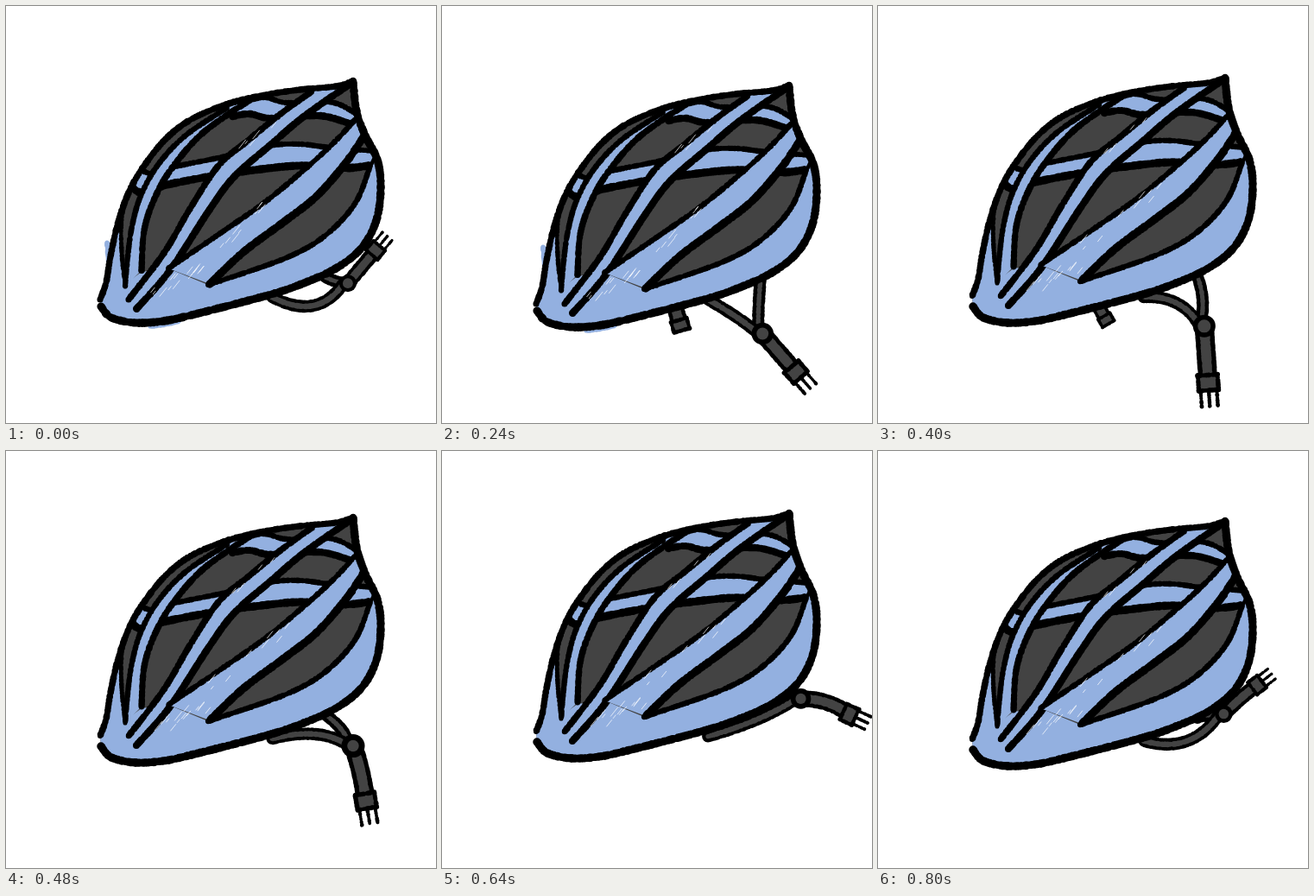
An HTML page with a canvas for the animation above (0.88 s loop, 498 px wide and 483 px high).

```html
<!DOCTYPE html>
<html lang="en">
<head>
<meta charset="utf-8">
<title>Helmet</title>
<style>
  html, body { margin: 0; width: 100%; height: 100%; overflow: hidden; background: #fff; }
  canvas { display: block; }
</style>
</head>
<body>
<canvas id="stage" width="498" height="483"></canvas>
<script>
const W = 498, H = 483, STEP = 80, COUNT = 11;
const BLACK = '#000', DARK = '#434343', BLUE = '#93b0e0';
const { sin, cos, PI, hypot } = Math;
const stage = document.getElementById('stage').getContext('2d');
let g = stage, seed = 1;

function random() {
  seed = (seed * 16807) % 2147483647;
  return seed / 2147483647;
}

// Catmull-Rom curve through flat x,y pairs, sampled about every pixel
function curve(...flat) {
  const p = [], out = [];
  for (let i = 0; i < flat.length; i += 2) p.push([flat[i], flat[i + 1]]);
  for (let i = 0; i < p.length - 1; i++) {
    const a = p[i - 1] || p[i], b = p[i], c = p[i + 1], d = p[i + 2] || c;
    const n = Math.ceil(hypot(c[0] - b[0], c[1] - b[1]));
    for (let k = 0; k <= n; k++) {
      const t = k / n;
      out.push([0, 1].map(j => b[j] + t / 2 * (c[j] - a[j] +
        t * (2 * a[j] - 5 * b[j] + 4 * c[j] - d[j] +
        t * (3 * (b[j] - c[j]) + d[j] - a[j])))));
    }
  }
  return out;
}

function bow(x0, y0, x1, y1, x2, y2) {
  const n = Math.ceil(hypot(x1 - x0, y1 - y0) + hypot(x2 - x1, y2 - y1));
  return Array.from({ length: n + 1 }, (_, i) => {
    const t = i / n, u = 1 - t;
    return [u * u * x0 + 2 * u * t * x1 + t * t * x2,
            u * u * y0 + 2 * u * t * y1 + t * t * y2];
  });
}

// Crayon line: overlapping dabs with a slightly uneven edge
function ink(points, width, color = BLACK) {
  g.fillStyle = color;
  g.beginPath();
  for (const [x, y] of points) {
    const r = width / 2 - 0.5 + random() * 0.9;
    g.moveTo(x + r, y);
    g.arc(x, y, r, 0, 7);
  }
  g.fill();
}

function area(points, color) {
  g.fillStyle = color;
  g.beginPath();
  points.forEach(([x, y]) => g.lineTo(x, y));
  g.fill();
}

// Blue strip between two inked edges
function rib(edgeA, widthA, edgeB, widthB) {
  area([...edgeA, ...[...edgeB].reverse()], BLUE);
  ink(edgeA, widthA);
  ink(edgeB, widthB);
}

function streaks(count, x, y, dx, dy, spread) {
  g.strokeStyle = 'rgba(255,255,255,.7)';
  g.beginPath();
  for (let i = 0; i < count; i++) {
    const along = random(), off = (random() - 0.5) * spread, size = 3 + random() * 9;
    const px = x + dx * along + off, py = y + dy * along + off;
    g.moveTo(px, py);
    g.lineTo(px + size * 0.8, py - size);
  }
  g.stroke();
}

function drawHelmet(lift, loose) {
  const top = curve(402, 87, 382, 93, 340, 97, 300, 103, 258, 113, 215, 131, 185, 154,
    160, 185, 143, 214, 130, 250, 121, 290, 116, 320, 109, 340)
    .map(([x, y]) => [x, y - lift]);
  const base = curve(110, 348, 122, 361, 150, 367, 182, 365, 215, 358, 300, 336,
    340, 323, 382, 304, 412, 280, 429, 248, 434, 210, 430, 178, 416, 150 - lift / 2,
    406, 122 - lift, 402, 87 - lift);
  const rim = curve(424, 178, 409, 220, 390, 247, 363, 271, 335, 287, 300, 301, 234, 323);
  const sliver = curve(142, 214, 134, 245, 134, 285, 138, 322);

  if (loose) {
    ink(curve(117, 274, 119, 295), 6, BLUE);
    ink(curve(167, 371, 182, 369, 200, 365), 6, BLUE);
  }
  g.save();
  area([...top, ...base], DARK);
  g.clip();
  g.translate(0, -lift);

  area([...rim, [188, 304], [157, 308], ...[...sliver].reverse(),
    [90, 214], [90, 400], [460, 400], [460, 178]], BLUE);
  ink(rim, 6);
  ink(sliver, 5);

  // cross bands
  rib(curve(150, 185, 168, 194, 196, 186, 250, 175, 305, 162, 340, 160, 375, 164, 428, 168), 6,
      curve(144, 207, 157, 216, 187, 207, 239, 197, 288, 190, 340, 185, 389, 188, 420, 185), 9);
  rib(curve(268, 114, 298, 106, 324, 112, 366, 111, 386, 114, 406, 125), 6,
      curve(262, 128, 282, 125, 306, 130, 352, 127, 375, 129, 406, 139), 8);

  // long ribs
  rib(curve(256, 118, 208, 150, 176, 184, 156, 220, 146, 255, 141, 290, 138, 325), 6,
      curve(282, 109, 228, 147, 192, 188, 172, 223, 160, 260, 157, 306), 7);
  rib(curve(354, 99, 318, 125, 280, 156, 246, 185, 213, 235, 183, 286, 142, 340), 7,
      curve(399, 90, 345, 128, 305, 162, 264, 198, 235, 237, 190, 306, 151, 351), 8);
  rib(curve(404, 132, 380, 158, 345, 190, 300, 227, 250, 262, 188, 304), 6,
      curve(415, 150, 394, 181, 360, 220, 322, 250, 275, 285, 236, 322), 9);

  streaks(14, 170, 335, 65, -30, 14);
  streaks(9, 235, 285, 105, -80, 12);
  streaks(5, 262, 176, 70, -58, 5);
  g.restore();

  ink(top, 7);
  ink(base, 9);
}

function makeHelmet(lift, loose) {
  const sheet = document.createElement('canvas');
  sheet.width = W;
  sheet.height = H;
  g = sheet.getContext('2d');
  seed = 71;
  drawHelmet(lift, loose);
  g = stage;
  return sheet;
}

const looseHelmet = makeHelmet(0, true);
const neatHelmet = makeHelmet(4, false);

const cycle = (i, peak) => cos(2 * PI * (i - peak) / COUNT);
const ease = (p, power = 1) => (0.5 - 0.5 * cos(PI * p)) ** power;

// The straps swing around a hub under the helmet; the tail follows one step later
function pose(i) {
  const bob = i < 5 ? 5 * sin(PI * i / 5) : -11 * sin(PI * (i - 5) / 5.3);

  const rising = i >= 4 && i < 8;
  const p = rising ? (i - 4) / 4 : ((i + 3) % COUNT) / 7;
  const swing = rising ? 1 - ease(p) : ease(p, 1.2);
  const theta = (88 * swing - 17) * PI / 180;
  const reach = 79 - (rising ? 10 : 22) * sin(PI * p ** 0.8) ** 2;
  const x = 340 + reach * cos(theta), y = 310 + reach * sin(theta);

  const tailEase = i < 5 ? ease(i / 5, 0.75) : 1 - ease((i - 5) / 6);
  const tail = (136 * tailEase - 50) * PI / 180;
  const length = 58 + 8 * cycle(i, 5.5);
  const droop = Math.max(0, sin(PI * (i - 5) / 6));

  return { bob, swing, x, y, tail, droop,
    clipX: x + length * cos(tail), clipY: y + length * sin(tail),
    size: 0.92 + 0.12 * cycle(i, 5),
    sag: 8 + 28 * cycle(i, 0), bulge: 12 * cycle(i, 6) };
}

function strap(points, outer, inner) {
  ink(points, outer);
  ink(points, inner, DARK);
}

function block(length, width) {
  const a = length / 2, b = width / 2;
  area([[-a, -b], [a, -b], [a, b], [-a, b]], DARK);
  for (const s of [-1, 1]) {
    ink(curve(-a, s * b, a, s * b), 5);
    ink(curve(s * a, -b, s * a, b), 5);
  }
}

function placed(x, y, turn, scale, paint) {
  g.save();
  g.translate(x, y);
  g.rotate(turn);
  g.scale(scale, scale);
  paint();
  g.restore();
}

function drawStraps({ bob, swing, x, y, tail, droop, clipX, clipY, size, sag, bulge }) {
  const joint = x - 5, frontY = 337 + bob * 0.6, rearY = 311 + bob;
  strap(bow(369, rearY, (369 + joint) / 2 + bulge, (rearY + y) / 2, joint, y), 14, 5);
  strap(bow(308, frontY, (308 + joint) / 2 + 12, (frontY + y) / 2 + sag, joint, y), 14, 6);

  strap(bow(x, y, (x + clipX) / 2 + 5 * droop, (y + clipY) / 2 - 9 * droop, clipX, clipY),
    21 * size, 11 * size);
  ink([[x, y]], 26 * size);
  ink([[x, y]], 14 * size, DARK);

  placed(clipX, clipY, tail + 0.12 * droop, size, () => {
    for (const s of [-9, 0, 9]) ink(curve(10, s, 26, s), 4);
    block(17, 22);
  });

  // the second clip shows only near the lowest point of the swing
  const drop = (swing - 0.8) / 0.2;
  if (drop > 0) {
    placed(257 + 27 * drop, 360 + 14 * drop, 0.9 + 0.55 * drop, 0.65 + 0.35 * drop, () => {
      strap(curve(-28, 0, -8, 0), 22, 12);
      block(14, 21);
    });
  }
}

function draw(now) {
  const i = Math.floor(now / STEP) % COUNT;
  const now3 = pose(i);
  seed = 19 + i * 37;
  g.fillStyle = '#fff';
  g.fillRect(0, 0, W, H);
  drawStraps(now3);
  g.drawImage(i < 5 ? looseHelmet : neatHelmet, 0, Math.round(now3.bob));
}

let start;
function tick(now) {
  start ??= now;
  draw(now - start);
  requestAnimationFrame(tick);
}
draw(0);
requestAnimationFrame(tick);
</script>
</body>
</html>
```
